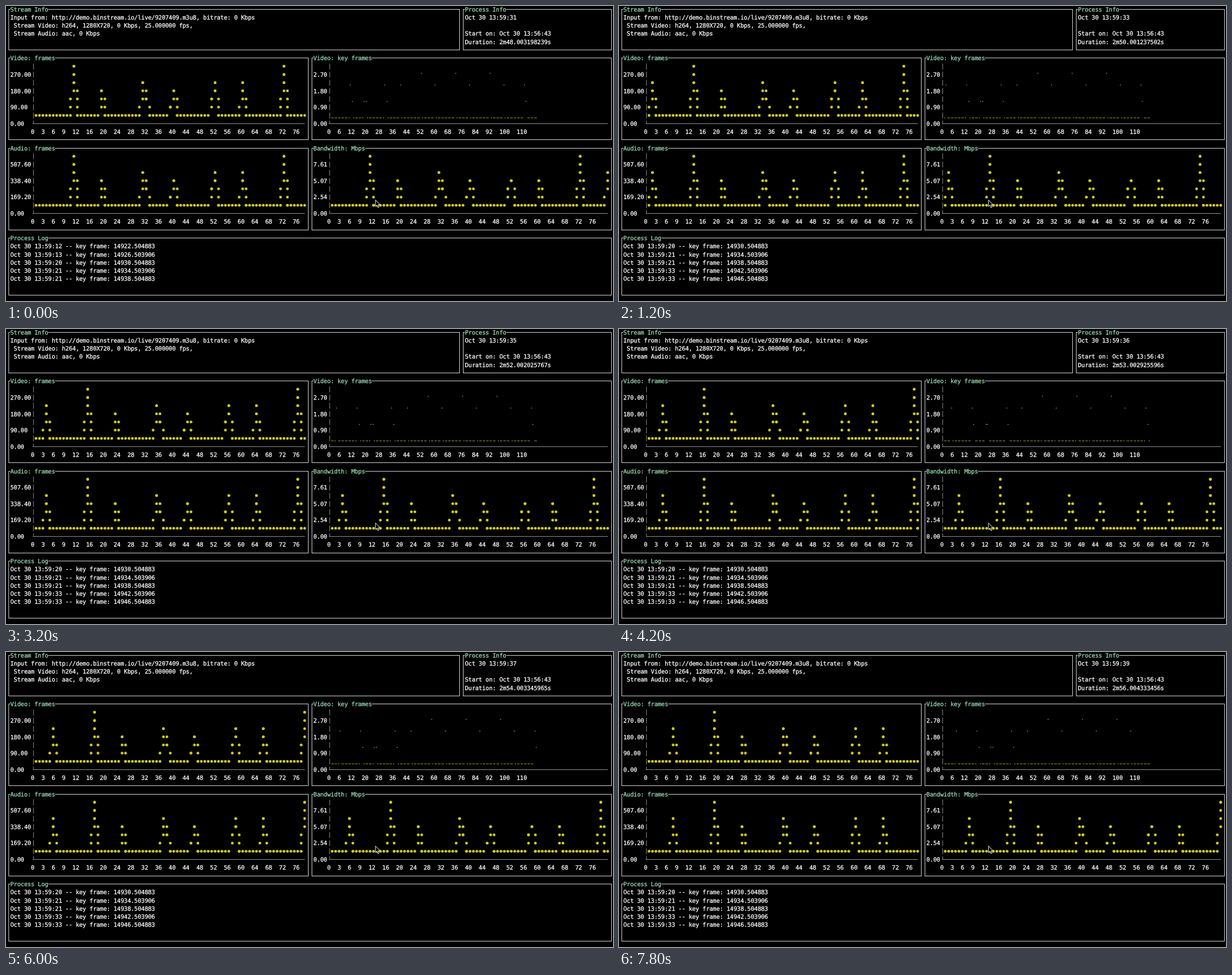
Write an HTML page with a canvas that moves like this. It is 987x480 px and loops after 8000 ms.

```html
<!DOCTYPE html>
<html lang="en">
<head>
<meta charset="utf-8">
<title>Stream monitor</title>
<style>
  html, body { margin: 0; width: 100%; height: 100%; overflow: hidden; background: #000; }
  canvas { display: block; }
</style>
</head>
<body>
<canvas id="stage" width="987" height="480"></canvas>
<script>
const ctx = document.getElementById('stage').getContext('2d');
const LOOP = 8000;
const WHITE = '#fff', GREEN = '#98dcb4', LINE = '#c4c4c4', AXIS = '#858585', YELLOW = '#d0ca20';

// Terminal grid: centre of a cell
const cx = col => 4.3 + 5.6 * col;
const cy = row => 5 + 13.3 * row;
const snap = v => Math.floor(v) + 0.5;

// Runs of values by the index at which they start; a higher index is older
const expand = runs => {
  const values = {};
  for (const [start, run] of runs) run.forEach((v, i) => values[start + i] = v);
  return values;
};
const traffic = expand([
  [-1, [5]], [11, [7]], [19, [4]], [31, [5, 3]], [39, [2, 4]],
  [51, [3, 5]], [60, [5]], [72, [7]], [80, [5]]
]);
const bandwidth = { ...traffic, 52: 4, 60: 4 };
const keyFrames = expand([
  [-1, [2]], [11, [2, 1]], [19, [1, 1]], [31, [2, 1]], [40, [2]], [52, [3]],
  [60, [2]], [72, [3]], [80, [2]], [92, [3]], [100, [2]], [112, [2, 1]]
]);
const nanos = ['003198239', '002219874', '001237502', '004095158', '002025767',
  '002925596', '003345965', '003839712', '004333456'];
const log = ['12 -- key frame: 14922.504883', '13 -- key frame: 14926.503906',
  '20 -- key frame: 14930.504883', '21 -- key frame: 14934.503906',
  '21 -- key frame: 14938.504883', '33 -- key frame: 14942.503906',
  '33 -- key frame: 14946.504883'];

function text(str, col, row, color = WHITE) {
  ctx.fillStyle = ctx.strokeStyle = color;
  ctx.lineWidth = 0.25;
  [...str].forEach((ch, i) => {
    ctx.fillText(ch, cx(col + i), cy(row) + 3.5);
    ctx.strokeText(ch, cx(col + i), cy(row) + 3.5);
  });
  ctx.lineWidth = 1;
}

function line(x1, y1, x2, y2) {
  ctx.strokeStyle = AXIS;
  ctx.beginPath();
  ctx.moveTo(x1, y1);
  ctx.lineTo(x2, y2);
  ctx.stroke();
}

function box(title, left, top, right, bottom) {
  const x = snap(cx(left)), y = snap(cy(top));
  ctx.strokeStyle = LINE;
  ctx.strokeRect(x, y, snap(cx(right)) - x, snap(cy(bottom)) - y);
  ctx.fillStyle = '#000';
  ctx.fillRect(cx(left) + 2.8, y - 1, title.length * 5.6, 3);
  text(title, left + 1, top, GREEN);
}

function axes(left, top, end, yLabels) {
  const x = cx(left) + 1.2, base = snap(cy(top + 8));
  for (let row = top + 1; row < top + 8; row++) line(x, cy(row) - 4.5, x, cy(row) + 5);
  line(x, base - 5, x, base);
  line(cx(left), base, cx(end), base);
  yLabels.forEach((label, i) => text(label, left - yLabels[0].length, top + 8 - 2 * i));
}

// Each label is followed by two blank cells; perCell values share one cell
function xLabels(left, row, end, perCell) {
  for (let col = 0; col * perCell <= end;) {
    const label = String(col * perCell);
    text(label, left + col, row);
    col += label.length + 2;
  }
}

// The newest value has only just begun to count
const valueAt = (values, index, step, rest) =>
  index === -step ? rest : values[index] ?? rest;

function dot(col, row) {
  ctx.beginPath();
  ctx.arc(cx(col) - 0.3, cy(row), 2.25, 0, 7);
  ctx.fill();
}

// Neighbouring values are joined by dots split between their two columns
function lineChart(title, left, top, right, axisCol, lastCol, yLabels, values, step) {
  box(title, left, top, right, top + 10);
  axes(axisCol, top, lastCol, yLabels);
  xLabels(axisCol, top + 9, 76, 1);
  ctx.fillStyle = YELLOW;
  const first = axisCol + 1;
  const height = col => valueAt(values, col - first - step, step, 1);
  for (let col = first; col < lastCol; col++) {
    const from = height(col), rise = height(col + 1) - from;
    const span = Math.abs(rise), leftCount = Math.max(1, span >> 1);
    dot(col, top + 8 - from);
    for (let k = 1; k <= span; k++) {
      dot(k < leftCount ? col : col + 1, top + 8 - from - k * Math.sign(rise));
    }
  }
  dot(lastCol, top + 8 - height(lastCol));
}

function keyFrameChart(step) {
  box('Video: key frames', 88, 6, 175, 16);
  axes(93, 6, 174, ['0.00', '0.90', '1.80', '2.70']);
  xLabels(93, 15, 110, 2);
  const levels = [182, 155.3, 128.7, 109.5];
  for (let i = 0; i < 120; i++) {
    const value = valueAt(keyFrames, i - step, step, 0);
    const x = cx(94 + (i >> 1)) + (i % 2 ? 1.1 : -1);
    ctx.fillStyle = value ? '#b9b67c' : YELLOW;
    ctx.fillRect(x - 0.65, levels[value] - 0.6, 1.3, 1.2);
  }
}

function pointer(x, y) {
  const outline = [[0, 0], [0, 10.6], [2.4, 8.5], [4, 12.4], [5.8, 11.6], [4.2, 7.9], [7.2, 7.6]];
  ctx.beginPath();
  outline.forEach(([dx, dy]) => ctx.lineTo(x + dx, y + dy));
  ctx.closePath();
  ctx.fillStyle = '#000';
  ctx.fill();
  ctx.strokeStyle = '#e4e4e4';
  ctx.stroke();
}

function draw(step) {
  ctx.fillStyle = '#000';
  ctx.fillRect(0, 0, 987, 480);
  ctx.font = '9.6px "DejaVu Sans Mono", monospace';
  ctx.textAlign = 'center';
  ctx.textRendering = 'geometricPrecision';
  ctx.lineWidth = 1;

  box('Stream Info', 0, 0, 131, 5);
  text('Input from: http://demo.binstream.io/live/9207409.m3u8, bitrate: 0 Kbps', 1, 1);
  text(' Stream Video: h264, 1280X720, 0 Kbps, 25.000000 fps,', 1, 2);
  text(' Stream Audio: aac, 0 Kbps', 1, 3);

  box('Process Info', 132, 0, 175, 5);
  text(`Oct 30 13:59:${31 + step}`, 133, 1);
  text('Start on: Oct 30 13:56:43', 133, 3);
  text(`Duration: 2m${48 + step}.${nanos[step]}s`, 133, 4);

  lineChart('Video: frames', 0, 6, 87, 7, 86, ['0.00  ', '90.00 ', '180.00', '270.00'], traffic, step);
  keyFrameChart(step);
  lineChart('Audio: frames', 0, 17, 87, 7, 86, ['0.00  ', '169.20', '338.40', '507.60'], traffic, step);
  lineChart('Bandwidth: Mbps', 88, 17, 175, 93, 174, ['0.00', '2.54', '5.07', '7.61'], bandwidth, step);

  box('Process Log', 0, 28, 175, 35);
  const first = step < 2 ? 0 : 2;
  log.slice(first, first + 5).forEach((entry, i) => text(`Oct 30 13:59:${entry}`, 1, 29 + i));

  pointer(600.8, 315.6);
}

function tick() {
  // The display refreshes once a second, first at 200 ms
  draw(Math.floor((performance.now() % LOOP + 800) / 1000));
  requestAnimationFrame(tick);
}
tick();
</script>
</body>
</html>
```
